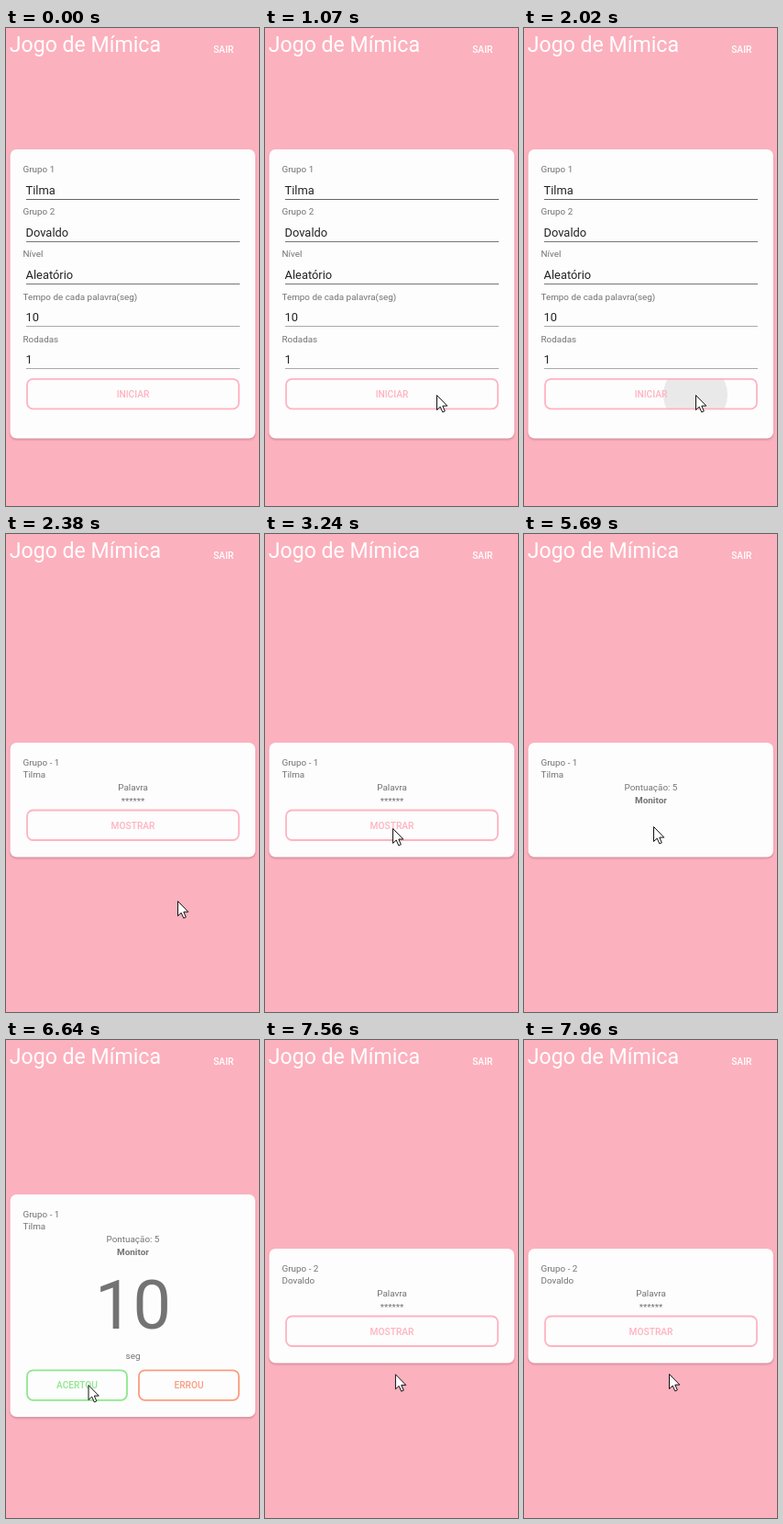
Animation, 276 px wide and 520 px high, one loop 8 s. Source, as an HTML page:

```html
<!DOCTYPE html>
<html lang="pt">
<head>
<meta charset="utf-8">
<style>
  html, body { margin: 0; width: 100%; height: 100%; overflow: hidden; background: #fcb1be; }
  svg { position: absolute; left: 0; top: 0; font: 9.9px Roboto, sans-serif; }
</style>
</head>
<body>
<svg id="stage" width="276" height="520" viewBox="0 0 276 520"></svg>
<script>
const LOOP = 8000;
const PINK = '#ffb3c1', GREEN = '#8fe78f', SALMON = '#fb9d82';
const GRAY = '#737373', INK = '#222';
const TEAMS = ['Tilma', 'Dovaldo'];
const MID = 138.5;

const stage = document.getElementById('stage');

function add(parent, tag, attrs, content) {
  const el = document.createElementNS('http://www.w3.org/2000/svg', tag);
  for (const key in attrs) el.setAttribute(key, attrs[key]);
  if (content) el.textContent = content;
  parent.appendChild(el);
  return el;
}

function label(parent, content, x, y, attrs) {
  return add(parent, 'text', { x, y, fill: GRAY, ...attrs }, content);
}

function centered(parent, content, y, attrs) {
  return label(parent, content, MID, y, { 'text-anchor': 'middle', ...attrs });
}

function card(parent, top, bottom) {
  const box = { x: 4.5, width: 267.5, height: bottom - top, rx: 7 };
  add(parent, 'rect', { ...box, y: top + 1.5, fill: '#b06a7a', opacity: .55, filter: 'url(#soft)' });
  add(parent, 'rect', { ...box, y: top, fill: '#fdfdfd' });
}

const ripples = [];

// press: { at, x, y } starts a touch ripple clipped to the button
function button(parent, content, x, y, w, color, press) {
  const g = add(parent, 'g', {});
  const box = { x: x + 1, y: y + 1, width: w - 2, height: 32.5, rx: 6.5 };
  if (press) {
    const id = 'clip' + ripples.length;
    add(add(g, 'clipPath', { id }), 'rect', box);
    const wrap = add(g, 'g', { 'clip-path': `url(#${id})` });
    const el = add(wrap, 'circle', { cx: press.x, cy: press.y, r: 0, fill: '#000', opacity: 0 });
    ripples.push({ el, at: press.at, reach: w * .8 });
  }
  add(g, 'rect', { ...box, fill: 'none', stroke: color, 'stroke-width': 1.8 });
  label(g, content, x + w / 2, y + 21, {
    'text-anchor': 'middle', fill: color, 'font-size': 10.2, 'font-weight': 500
  });
  return g;
}

function scene(from, to) {
  const el = add(stage, 'g', {});
  scenes.push({ el, from, to });
  return el;
}

function heading(parent, team, top) {
  label(parent, 'Grupo - ' + (team + 1), 18.5, top + 24.5);
  label(parent, TEAMS[team], 18.5, top + 38.3);
}

function score(parent, top) {
  centered(parent, 'Pontuação: 5', top + 52);
  centered(parent, 'Monitor', top + 66, { 'font-weight': 700 });
}

function hiddenWord(from, to, team, press) {
  const g = scene(from, to);
  card(g, 227, 351.5);
  heading(g, team, 227);
  centered(g, 'Palavra', 279);
  centered(g, '******', 293.5);
  button(g, 'MOSTRAR', 22, 299.5, 233, PINK, press);
}

const scenes = [];
const soft = add(add(stage, 'defs', {}), 'filter', { id: 'soft', x: '-5%', y: '-5%', width: '110%', height: '115%' });
add(soft, 'feGaussianBlur', { stdDeviation: 1 });

add(stage, 'rect', { width: 276, height: 520, fill: '#fcb1be' });
label(stage, 'Jogo de Mímica', 3.8, 26, { fill: '#fff', 'font-size': 23.1 });
label(stage, 'SAIR', 237.3, 26.5, {
  fill: '#fff', 'text-anchor': 'middle', 'font-size': 10.2, 'font-weight': 500
});

// Setup form
const setup = scene(0, 2380);
card(setup, 132, 446.5);
[
  ['Grupo 1', TEAMS[0], '#666'],
  ['Grupo 2', TEAMS[1], '#777'],
  ['Nível', 'Aleatório', '#777'],
  ['Tempo de cada palavra(seg)', '10', '#aaa'],
  ['Rodadas', '1', '#aaa']
].forEach(([name, value, line], i) => {
  const y = i * 46.1;
  label(setup, name, 18.5, 157.2 + y);
  label(setup, value, 21.5, 181 + y, { fill: INK, 'font-size': 12.9 });
  add(setup, 'rect', { x: 22, y: Math.round(186 + y), width: 233, height: 1, fill: line });
});
button(setup, 'INICIAR', 22, 380.8, 233, PINK, { at: 1960, x: 187, y: 399 });

hiddenWord(2380, 4100, 0, { at: 4040, x: 141, y: 318 });

// Word revealed, waiting for the start
const ready = scene(4100, 5780);
card(ready, 227, 351.5);
heading(ready, 0, 227);
score(ready, 227);
const start = button(ready, 'INICIAR', 22, 299.5, 233, PINK, { at: 5290, x: 141, y: 318 });
scenes.push({ el: start, from: 4100, to: 5600 });

// Countdown
const timer = scene(5780, 7100);
card(timer, 168, 410);
heading(timer, 0, 168);
score(timer, 168);
const count = centered(timer, '10', 313.5, { 'font-size': 74 });
scenes.push({ el: count, from: 6630, to: 7100 });
centered(timer, 'seg', 347.3);
button(timer, 'ACERTOU', 22, 358.3, 111, GREEN, { at: 6660, x: 90, y: 375 });
button(timer, 'ERROU', 144, 358.3, 111, SALMON);

hiddenWord(7100, LOOP, 1);

// Mouse pointer: time, x, y
const path = [
  [620, 277, 368], [1070, 187.5, 399.5], [2400, 187.5, 399.5],
  [3130, 139, 321], [3220, 139, 321], [3290, 141.5, 318.5],
  [6110, 141.5, 318.5], [6600, 90, 375.5], [7130, 90, 375.5],
  [7730, 155, 361], [7760, 155, 361], [7960, 158.5, 363.5]
];
const pointer = add(stage, 'path', {
  d: 'M0 0V16L3.7 12.6L6.3 18.4L8.8 17.3L6.3 11.6H11.3Z',
  fill: '#fff', stroke: '#111', 'stroke-width': 1
});

const clamp = v => Math.max(0, Math.min(1, v));
const ease = v => v * v * (3 - 2 * v);

function pointerAt(t) {
  const i = path.findIndex(p => p[0] > t);
  if (i === 0) return [300, 368];
  if (i < 0) return path[path.length - 1].slice(1);
  const a = path[i - 1], b = path[i];
  const k = ease((t - a[0]) / (b[0] - a[0]));
  return [a[1] + (b[1] - a[1]) * k, a[2] + (b[2] - a[2]) * k];
}

function draw(t) {
  for (const s of scenes) {
    s.el.style.display = t >= s.from && t < s.to ? '' : 'none';
  }
  for (const r of ripples) {
    const k = clamp((t - r.at) / 220);
    r.el.setAttribute('r', r.reach * ease(k));
    r.el.setAttribute('opacity', .1 * Math.sin(Math.PI * k));
  }
  pointer.setAttribute('transform', `translate(${pointerAt(t)})`);
}

const begin = performance.now();
function tick() {
  draw((performance.now() - begin) % LOOP);
  requestAnimationFrame(tick);
}
tick();
</script>
</body>
</html>
```
